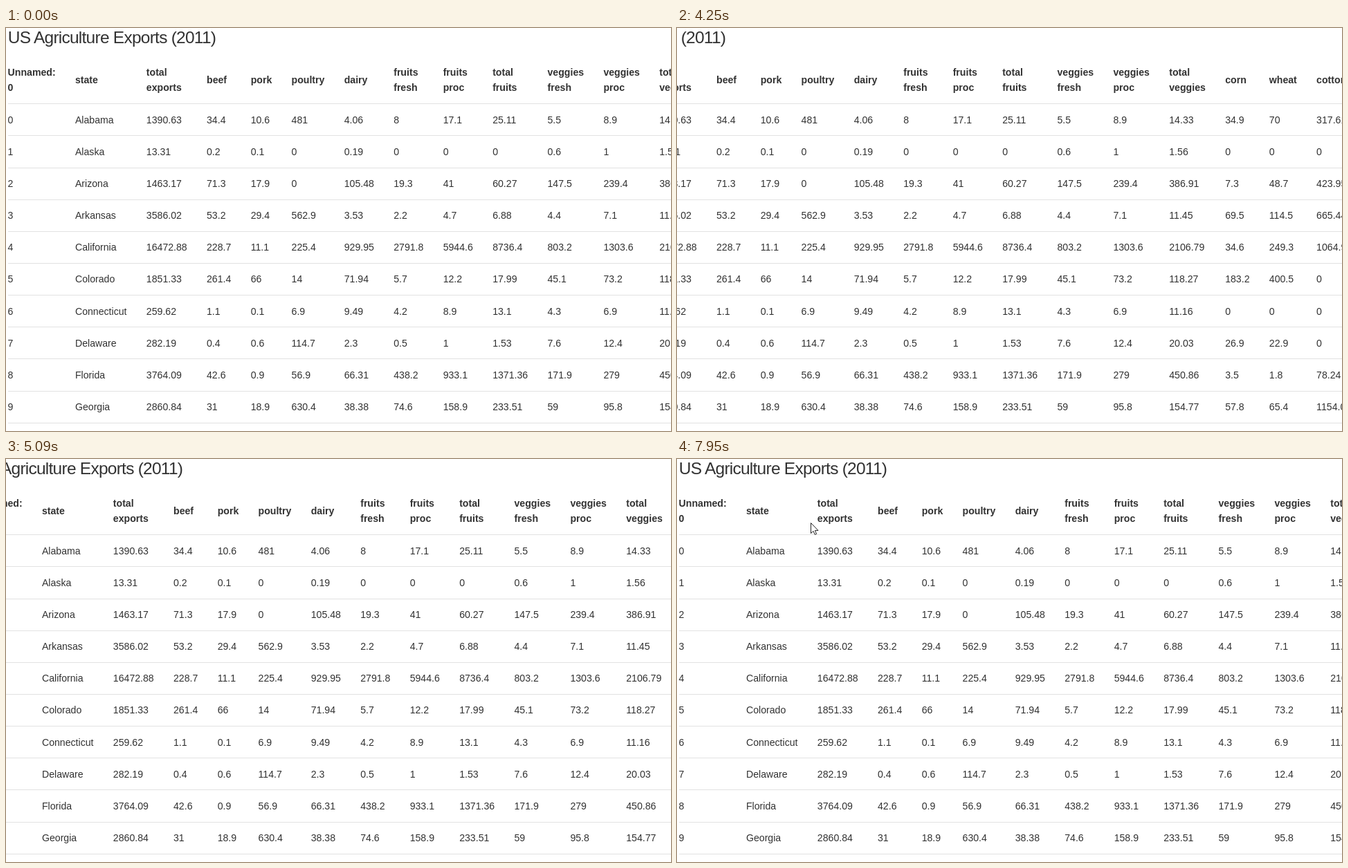
Animation of 961 by 583 pixels, one loop 8000 ms. Source, as an HTML page:

```html
<!DOCTYPE html>
<html lang="en">
<head>
<meta charset="utf-8">
<title>US Agriculture Exports (2011)</title>
<style>
html, body { margin: 0; width: 100%; height: 100%; overflow: hidden; background: #fff; }
svg { display: block; width: 961px; height: 583px; }
text { font: 14.14px "Liberation Sans", Arial, sans-serif; fill: #323232; }
.head { font-weight: 700; }
.title { font-size: 24.5px; letter-spacing: -.75px; }
.rule { fill: #e2e2e2; }
rect.sel { fill: none; }
.on rect.sel { fill: #3297fd; }
.on text.sel { fill: #fff; }
#cursor { fill: #fff; stroke: #222; stroke-width: 1; }
</style>
</head>
<body>
<svg viewBox="0 0 961 583">
  <g id="page"></g>
  <path id="cursor" d="M.5 .5V15.6L4 12.3L6.3 17.4L8.6 16.4L6.4 11.4H11Z"/>
</svg>
<script>
const page = document.getElementById('page');
const cursor = document.getElementById('cursor');
const padding = 14.14;
const heads = ('Unnamed: 0,state,total exports,beef,pork,poultry,dairy,fruits fresh,fruits proc,' +
  'total fruits,veggies fresh,veggies proc,total veggies,corn,wheat,cotton').split(',');

// State, exports, beef, pork, poultry, dairy, all fruits, all veggies, corn, wheat, cotton
const states = `Alabama 1390.63 34.4 10.6 481 4.06 25.11 14.33 34.9 70 317.61
Alaska 13.31 0.2 0.1 0 0.19 0 1.56 0 0 0
Arizona 1463.17 71.3 17.9 0 105.48 60.27 386.91 7.3 48.7 423.95
Arkansas 3586.02 53.2 29.4 562.9 3.53 6.88 11.45 69.5 114.5 665.44
California 16472.88 228.7 11.1 225.4 929.95 8736.4 2106.79 34.6 249.3 1064.95
Colorado 1851.33 261.4 66 14 71.94 17.99 118.27 183.2 400.5 0
Connecticut 259.62 1.1 0.1 6.9 9.49 13.1 11.16 0 0 0
Delaware 282.19 0.4 0.6 114.7 2.3 1.53 20.03 26.9 22.9 0
Florida 3764.09 42.6 0.9 56.9 66.31 1371.36 450.86 3.5 1.8 78.24
Georgia 2860.84 31 18.9 630.4 38.38 233.51 154.77 57.8 65.4 1154.07`.split('\n');

// Fresh and processed goods are fixed shares of their total
const split = (total, fresh) =>
  [total * fresh, total * (1 - fresh)].map(n => +n.toFixed(1)).concat(total);

const rows = states.map((line, r) => {
  const cells = line.split(' ');
  return [r, ...cells.slice(0, 6), ...split(cells[6], 0.31956),
    ...split(cells[7], 0.38124), ...cells.slice(8)];
});

function add(tag, attrs, content = '') {
  const el = document.createElementNS('http://www.w3.org/2000/svg', tag);
  for (const key in attrs) el.setAttribute(key, attrs[key]);
  el.textContent = content;
  return page.appendChild(el);
}

// Draws text and returns its width
const label = (x, y, content, cls = '') =>
  add('text', { x, y, class: cls }, content).getComputedTextLength();

function cell(x, r, c) {
  const y = Math.round(137.7 + 46.15 * r);
  const selected = r === 3 && c > 2 || r === 4 && c < 3;
  const width = label(x, y, rows[r][c], selected ? 'sel' : '');
  if (selected) {
    const text = page.lastChild;
    page.insertBefore(add('rect', { x, y: y - 16, width, height: 23, class: 'sel' }), text);
  }
  return width;
}

label(2.7, 22, 'US Agriculture Exports (2011)', 'title');
for (let i = 0; i <= rows.length; i++) {
  add('rect', { x: 3, y: Math.round(109.2 + 46.16 * i), width: 1300, height: 1, class: 'rule' });
}

// Each column is as wide as its longest word plus padding
let x = 2.6;
heads.forEach((head, c) => {
  const words = head.split(' ');
  const top = words.length > 1 ? 69 : 80;
  const widths = words.map((word, i) => label(x, top + 22 * i, word, 'head'));
  rows.forEach((_, r) => widths.push(cell(x, r, c)));
  x += Math.max(...widths) + 2 * padding;
});

// Progress from a to b, advancing in 70 ms steps
const progress = (t, a, b) =>
  t >= b ? 1 : t < a ? 0 : Math.floor((t - a) / 70) * 70 / (b - a);
const smooth = u => u * u * (3 - 2 * u);
const mix = (a, b, u) => a + (b - a) * u;

function scrollAt(t) {
  if (t < 4250) return mix(0, 236, smooth(progress(t, 430, 1130)));
  if (t < 4600) return mix(233, 150, progress(t, 4250, 4600) ** 1.25);
  if (t < 5090) return mix(150, 48, progress(t, 4600, 5090));
  return mix(48, 0, smooth(progress(t, 5090, 5360)));
}

function draw(t) {
  page.setAttribute('transform', `translate(${-Math.round(scrollAt(t))})`);
  page.setAttribute('class', t >= 7030 && t < 7250 ? 'on' : '');

  const first = smooth(progress(t, 6550, 6830));
  const second = smooth(progress(t, 7180, 7950));
  const cx = mix(mix(294, 252, first), 193, second);
  const cy = mix(mix(419, 290, first), 92, second);
  cursor.setAttribute('transform', `translate(${Math.round(cx)} ${Math.round(cy)})`);
  cursor.setAttribute('visibility', t < 6550 ? 'hidden' : 'visible');
}

const start = performance.now();
function tick() {
  draw((performance.now() - start) % 8000);
  requestAnimationFrame(tick);
}
tick();
</script>
</body>
</html>
```
